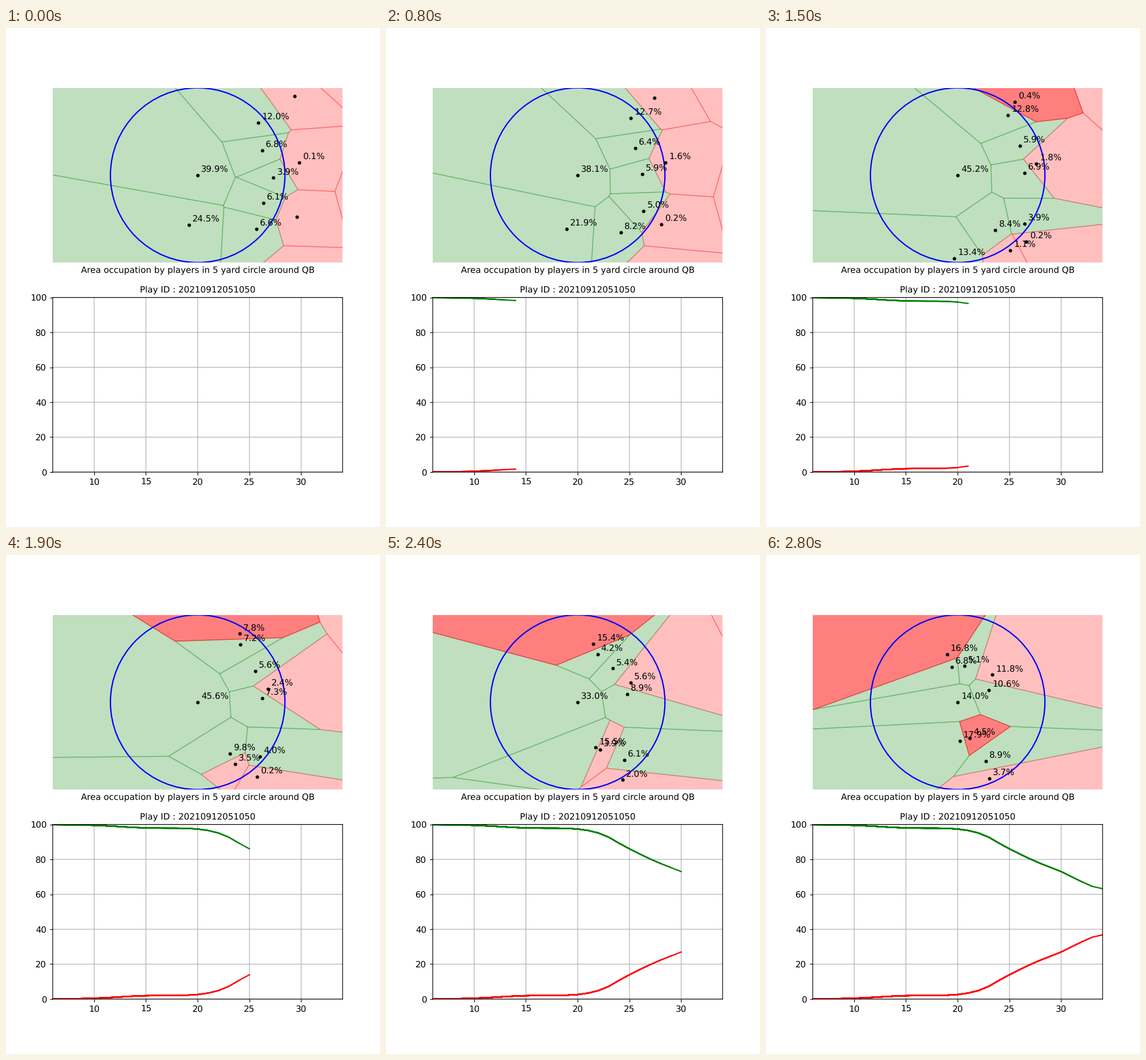
These frames come from a looping animation (648 by 864 pixels, 2900 ms). A matplotlib script:

```python
import numpy as np
import matplotlib.pyplot as plt
from matplotlib.animation import FuncAnimation
from matplotlib.patches import Circle, Polygon

FRAMES = 29
TIMES = np.arange(FRAMES)
KEYS = np.array([0, 8, 19, 28])

# The field is laid out in stage pixels.
LEFT, RIGHT, TOP, BOTTOM = 81, 583.2, 103.68, 406.08
QB = np.array([332.1, 254.9])
RADIUS = 151.2
OFFSET = 6.05

# Where each player is at the key times.
BLOCKERS = [
    [(316.7, 341), (312.8, 347.8), (334, 441), (342, 560)],
    [(437.2, 164.2), (424.2, 156), (405.6, 154.7), (321.5, 194.3)],
    [(443.8, 212), (432, 208.3), (432.2, 201.2), (343.8, 192)],
    [(463.4, 259.5), (444.2, 253), (443.6, 248), (385.8, 234)],
    [(445.5, 302.8), (446.4, 317.3), (440, 349), (381, 356.7)],
    [(434.4, 348), (406.5, 353.8), (388, 344.2), (335.5, 322)],
]
RUSHERS = [
    [(500, 118.4), (464.6, 121.2), (405, 136.5), (313.5, 172)],
    [(508.4, 233), (484, 233), (454, 232), (392, 207.5)],
    [(504, 327), (476.8, 340), (434.5, 384), (387, 387)],
    [(501, 428.3), (469.5, 419), (396.8, 362), (353, 317)],
]


def run(route):
    """Smooth path from rest through a route, one row per frame."""
    route = np.array(route, float)
    slope = np.gradient(route, KEYS, axis=0, edge_order=2)
    slope[0] = 0
    i = np.clip(np.searchsorted(KEYS, TIMES, side="right") - 1, 0, len(KEYS) - 2)
    h = (KEYS[i + 1] - KEYS[i])[:, None]
    u = (TIMES - KEYS[i])[:, None] / h
    return ((1 + 2 * u) * (1 - u) ** 2 * route[i]
            + u * (1 - u) ** 2 * h * slope[i]
            + u * u * (3 - 2 * u) * route[i + 1]
            + u * u * (u - 1) * h * slope[i + 1])


def drop_back(x, y):
    """A deep defender who speeds up away from the ball."""
    return np.column_stack([x + 0.32 * TIMES ** 2, np.full(FRAMES, y)])


def clip(poly, p, q):
    """Keep the part of a polygon that lies nearer to p than to q."""
    side = (poly - (p + q) / 2) @ (q - p)
    if (side <= 0).all():
        return poly
    out = []
    for a, b, sa, sb in zip(poly, np.roll(poly, -1, 0), side, np.roll(side, -1)):
        if sa <= 0:
            out.append(a)
        if (sa <= 0) != (sb <= 0):
            out.append(a + (b - a) * sa / (sa - sb))
    return np.array(out).reshape(-1, 2)


def area(poly):
    x, y = poly.T
    return abs(x @ np.roll(y, -1) - y @ np.roll(x, -1)) / 2


def cell(sites, i, poly):
    """Voronoi cell of site i within poly, and whether it touches the QB's cell."""
    for j in range(len(sites) - 1, 0, -1):
        if j != i:
            poly = clip(poly, sites[i], sites[j])
    if i == 0:
        return poly, False
    final = clip(poly, sites[i], sites[0])
    return final, final is not poly


angle = np.linspace(0, 2 * np.pi, 180, endpoint=False)
DISC = QB + RADIUS * np.column_stack([np.cos(angle), np.sin(angle)])
PLANE = np.array([(-600, -600), (1300, -600), (1300, 1100), (-600, 1100)], float)

offense = [np.tile(QB, (FRAMES, 1))] + [run(r) for r in BLOCKERS]
defense = [run(r) for r in RUSHERS] + [drop_back(556, 57), drop_back(649, 287)]
paths = np.stack(offense + defense, axis=1)
count = paths.shape[1]

# Percent of the circle held by each player, and by the whole defense.
shares = np.array([[100 * area(cell(sites, i, DISC)[0]) / area(DISC)
                    for i in range(count)] for sites in paths])
pressure = shares[:, len(offense):].sum(axis=1)

plt.rcParams.update({"path.snap": False, "text.hinting": "none"})
fig, (field, chart) = plt.subplots(2, 1, figsize=(6, 8), dpi=108)

field.set_xlim(LEFT, RIGHT)
field.set_ylim(BOTTOM, TOP)
field.axis("off")
cells = []
for i in range(count):
    color = "green" if i < len(offense) else "red"
    cells.append(field.add_patch(Polygon(PLANE, color=color, alpha=0.25, lw=1)))
field.add_patch(Circle(QB, RADIUS, fill=False, ec="blue", lw=1.5))
dots, = field.plot([], [], "k.")
labels = [field.text(0, 0, "", fontsize=10) for _ in range(count)]

chart.set_xlim(6, 34)
chart.set_ylim(0, 100)
chart.grid(True)
chart.set_title("Area occupation by players in 5 yard circle around QB\n\n"
                "Play ID : 20210912051050", fontsize=10)
# Every step draws the whole history again on top of the earlier ones.
history = []
for n in range(1, FRAMES + 1):
    x = 6 + TIMES[:n]
    history.append(chart.plot(x, 100 - pressure[:n], "g", x, pressure[:n], "r", lw=1.5))


def draw(k):
    sites = paths[k]
    dots.set_data(sites[:, 0], sites[:, 1])
    for i, (x, y) in enumerate(sites):
        poly, touching = cell(sites, i, PLANE)
        cells[i].set_xy(poly)
        cells[i].set_alpha(0.5 if touching and i >= len(offense) else 0.25)
        labels[i].set_position((x + OFFSET, y - OFFSET))
        labels[i].set_text(f"{shares[k, i]:.1f}%")
        inside = LEFT < x < RIGHT and TOP < y < BOTTOM
        labels[i].set_visible(inside and shares[k, i] >= 0.05)
    for n, lines in enumerate(history):
        for line in lines:
            line.set_visible(n <= k)


anim = FuncAnimation(fig, draw, frames=FRAMES, interval=100, repeat=True)
plt.show()
```
